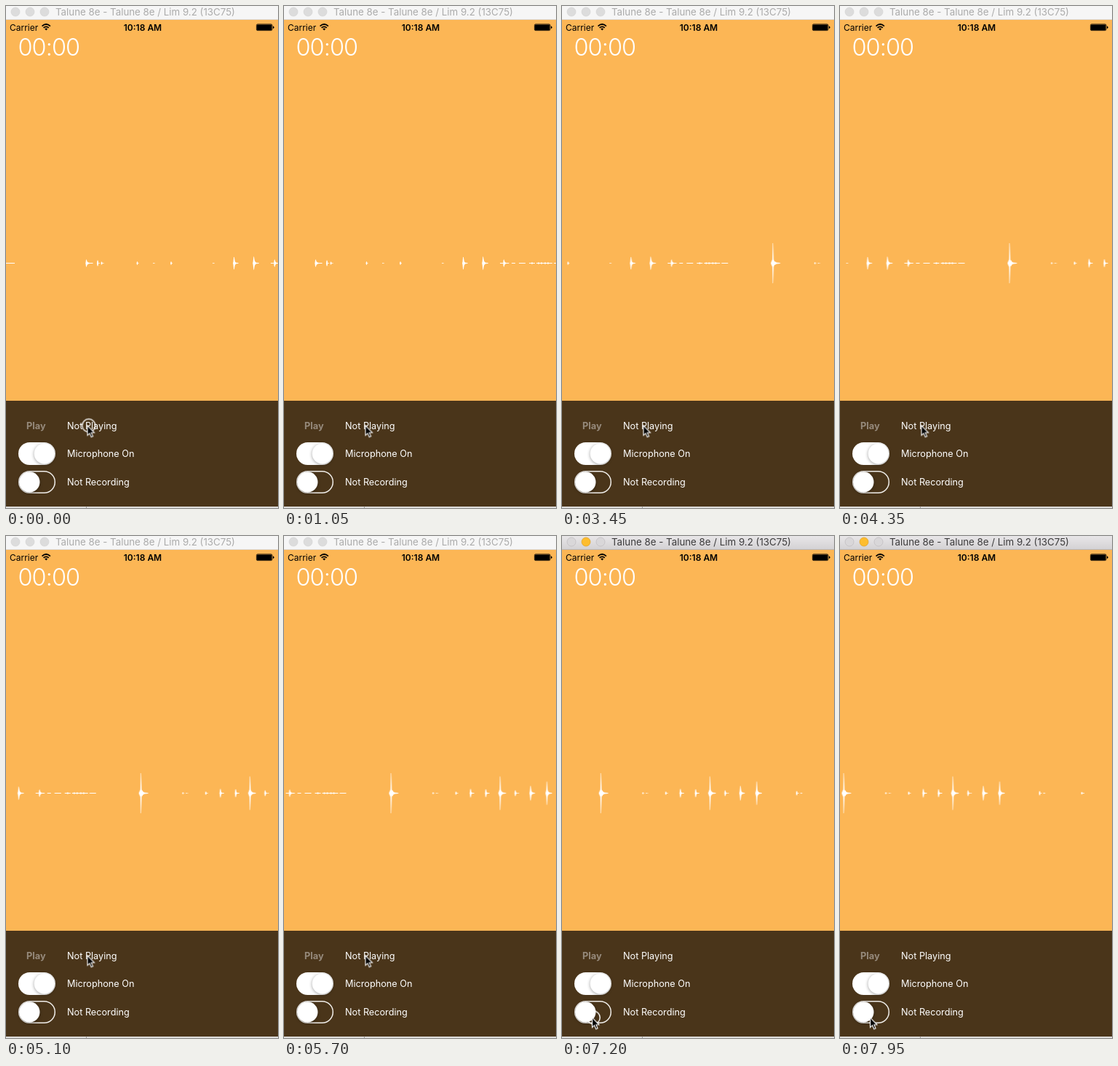
Write an HTML page that moves like this. It is 374 px wide and 688 px high and loops after 8000 ms.

```html
<!DOCTYPE html>
<html lang="en">
<head>
<meta charset="utf-8">
<title>Audio recorder</title>
<style>
  html, body { margin: 0; width: 100%; height: 100%; overflow: hidden; }
  svg { display: block; width: 374px; height: 688px; font-family: Inter, Roboto, sans-serif; }

  .label { font-size: 12.7px; fill: #fff; }
  .play { font-size: 12.8px; font-weight: 700; fill: #968a7c; }
  .clock { font-size: 32.5px; font-weight: 300; letter-spacing: -.03em; fill: #fff; }
  .status { font-size: 12px; }
  .time { font-weight: 600; text-anchor: middle; }
  .title { font-size: 13.3px; }
  .knob { fill: #fff; stroke: rgba(0, 0, 0, .08); stroke-width: .6; filter: drop-shadow(0 1.5px 2px rgba(0, 0, 0, .35)); }

  #wave, #cursor, .active, .ring { animation: 8s step-end infinite; }
  #wave { animation-name: scroll; }
  #cursor { animation-name: move; }
  .active { animation-name: focus; }
  .ring { animation-name: tap; fill: none; stroke: #fff; stroke-width: 1.4; }

  @keyframes scroll {
    0% { transform: translateX(0); animation-timing-function: steps(7); }
    13.125% { transform: translateX(-67px); animation-timing-function: steps(9); }
    30% { transform: translateX(-152.5px); animation-timing-function: steps(13); }
    54.375% { transform: translateX(-275.5px); animation-timing-function: steps(9); }
    71.25% { transform: translateX(-361.5px); animation-timing-function: steps(6); }
    82.5% { transform: translateX(-416.7px); animation-timing-function: steps(9); }
    99.375%, 100% { transform: translateX(-503.5px); }
  }
  @keyframes move {
    0% { transform: translate(111.5px, 574.5px); }
    80.625% { transform: translate(103px, 582px); }
    82.5% { transform: translate(83.5px, 601px); }
    84.375% { transform: translate(62px, 629px); }
    86.25% { transform: translate(47px, 651px); }
    88.125%, 100% { transform: translate(41px, 659.5px); }
  }
  @keyframes focus {
    0% { opacity: 0; }
    90%, 100% { opacity: 1; }
  }
  @keyframes tap {
    0% { opacity: 1; }
    1.875% { opacity: 0; }
    90% { opacity: 1; }
    95.625%, 100% { opacity: 0; }
  }
</style>
</head>
<body>
<svg viewBox="0 0 374 688">
  <defs>
    <linearGradient id="bar" x2="0" y2="1">
      <stop stop-color="#e8e6e8"/>
      <stop offset="1" stop-color="#d3d1d3"/>
    </linearGradient>
  </defs>

  <rect width="374" height="688" fill="#fcb655"/>

  <!-- window bar -->
  <rect width="374" height="19" fill="#f6f6f6"/>
  <rect y="18" width="374" height="1" fill="#dcdad8"/>
  <g fill="#dcdcdc" stroke="#d0d0d0" stroke-width=".6">
    <circle cx="13" cy="8" r="6"/>
    <circle cx="33" cy="8" r="6"/>
    <circle cx="53" cy="8" r="6"/>
  </g>
  <text class="title" x="68" y="13" fill="#ababab">Talune 8e - Talune 8e / Lim 9.2 (13C75)</text>
  <g class="active">
    <rect width="374" height="19" fill="url(#bar)"/>
    <rect y="18" width="374" height="1" fill="#b9b6b6"/>
    <g stroke-width=".7">
      <circle cx="13" cy="8" r="6" fill="#d9d7d9" stroke="#bdbbbd"/>
      <circle cx="33" cy="8" r="6" fill="#fdbd2f" stroke="#dfa023"/>
      <circle cx="53" cy="8" r="6" fill="#d9d7d9" stroke="#bdbbbd"/>
    </g>
    <text class="title" x="68" y="13" fill="#3c3b3c">Talune 8e - Talune 8e / Lim 9.2 (13C75)</text>
  </g>

  <!-- status bar -->
  <text class="status" x="5" y="33.5">Carrier</text>
  <g fill="none" stroke="#000" stroke-width="1.7">
    <path d="M49.5 27.6Q55.2 22.4 60.9 27.6M51.6 29.9Q55.2 26.7 58.8 29.9"/>
    <path d="M55.2 33.4L53.2 31.3Q55.2 29.8 57.2 31.3Z" fill="#000" stroke="none"/>
  </g>
  <text class="status time" x="188" y="33.5">10:18 AM</text>
  <rect x="344.4" y="24.9" width="21.6" height="8.7" rx="1.6" fill="none" stroke="#000" stroke-width=".8"/>
  <rect x="345" y="25.5" width="20.4" height="7.5" rx=".8"/>
  <path d="M367 27.5Q368.6 27.8 368.6 29.2T367 31Z"/>
  <text class="clock" x="16.5" y="68">00:00</text>

  <path id="wave" fill="#fff"/>

  <!-- controls -->
  <rect y="541" width="374" height="145" fill="#4a351a"/>
  <rect y="686" width="374" height="2" fill="#dddbd9"/>
  <rect x="110" y="686.5" width="1" height="1.5" fill="#888"/>
  <text class="play" x="28" y="580">Play</text>
  <text class="label" x="84" y="579.5">Not Playing</text>
  <text class="label" x="84" y="618">Microphone On</text>
  <text class="label" x="84" y="657">Not Recording</text>
  <rect x="17" y="598" width="51" height="31" rx="15.5" fill="#fff"/>
  <circle class="knob" cx="52.7" cy="613.5" r="14.2"/>
  <rect x="17.7" y="637.7" width="49.6" height="29.6" rx="14.8" fill="none" stroke="#f0ede9" stroke-width="1.5"/>
  <circle class="knob" cx="32.3" cy="652.5" r="14.2"/>

  <g id="cursor">
    <circle class="ring" cx="2.3" cy=".5" r="9"/>
    <path d="M.5 .5V14L3.5 11.2 5.8 16.3 8.1 15.3 5.8 10.3H10Z" stroke="#fff" stroke-width="1.1"/>
  </g>
</svg>
<script>
  const MID = 352.5;

  // x, half height, length of the decay
  const peaks = [
    [110.5, 5, 9], [126, 4, 3], [131.5, 2, 3], [180.5, 2.2, 2], [203, .6, 2],
    [227, 2.2, 2], [285, .6, 2], [313.5, 8.5, 6], [340.7, 9, 7], [369.3, 5, 7],
    [508.7, 27.5, 10], [566.5, 1.3, 2], [571.5, .6, 2], [598, 2.2, 3],
    [618, 6, 5], [639, 5.5, 5], [658.7, 23, 8], [679.5, 4, 5], [700.5, 10, 6],
    [723, 16, 7], [778, 3, 3], [784, .7, 2], [836, 1.8, 3]
  ];
  // quiet stretches: start, end
  const hums = [[0, 12], [364, 368], [380, 385], [390, 399], [404, 412], [414, 436], [438, 447]];
  const bumps = [408, 417, 421, 426, 430];

  function peak([x, a, tail]) {
    const body = Math.min(a * .5, 5);
    const left = .8 + a / 14;
    const top = [
      [-left, .4], [-left * .7, body * .5], [-.8, body], [-.3, a], [.3, a], [1, body],
      [tail * .25, body * .5], [tail * .5, body * .18], [tail, .4]
    ];
    const low = top.map(([dx, h]) => [dx, -h]).reverse();
    return 'M' + top.concat(low).map(([dx, h]) => `${x + dx} ${MID - h}`).join('L') + 'Z';
  }
  const hum = ([from, to]) => `M${from} ${MID - .4}H${to}v.8H${from}Z`;
  const bump = x => peak([x, 1.3, 2.5]);

  document.getElementById('wave').setAttribute('d',
    [...peaks.map(peak), ...hums.map(hum), ...bumps.map(bump)].join(''));
</script>
</body>
</html>
```
